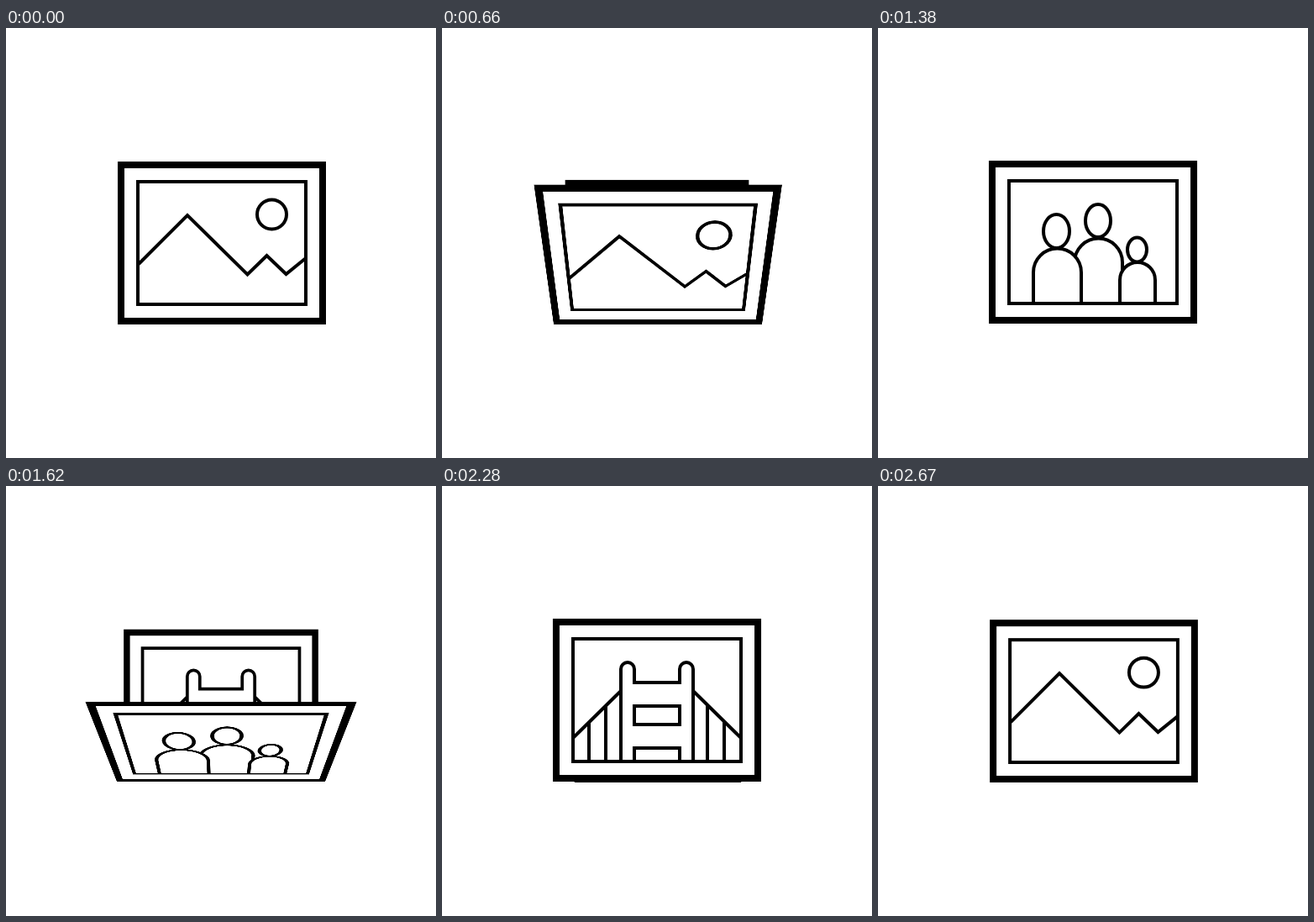
Animation, 512 px wide and 512 px high, one loop 2700 ms. Source, as an HTML page:

```html
<!DOCTYPE html>
<html lang="en">
<head>
<meta charset="utf-8">
<title>Falling picture frames</title>
<style>
  html, body { margin: 0; width: 100%; height: 100%; overflow: hidden; background: #fff; }
  #stage {
    position: relative; width: 512px; height: 512px; overflow: hidden;
    perspective: 725px; perspective-origin: 256px 256px;
  }
  svg {
    position: absolute; left: 0; top: 0; width: 512px; height: 512px;
    transform-origin: 256px 352px;
    fill: none; stroke: #000; stroke-width: 4;
  }
  .solid { fill: #fff; }
  .outer { fill: #fff; stroke-width: 8; }
</style>
</head>
<body>
<div id="stage"></div>
<script>
const HOLD = 470, MOVE = 420, SLOT = 900, STEP = 30;

const line = d => `<path d="${d}"/>`;
const head = (x, y, rx, ry) => `<ellipse class="solid" cx="${x}" cy="${y}" rx="${rx}" ry="${ry}"/>`;
const body = (x, y, r) =>
  `<path class="solid" d="M${x - r} 328V${y}a${r} ${r} 0 0 1 ${2 * r} 0V328"/>`;

const mountains =
  line('M157 280L215 222L286.5 292.5L309.5 270L332.5 292L356 273') +
  '<circle cx="315.5" cy="221" r="17.5"/>';

const family =
  body(262.5, 279, 28.5) + head(262, 229.5, 15, 19.5) +
  body(213.5, 291, 28.5) + head(212.5, 242, 15.5, 20) +
  body(309, 300, 21) + head(308.5, 264, 11.5, 14.5);

const bridge =
  line('M213 328V218a8 8 0 0 1 16 0V234H283V218a8 8 0 0 1 16 0V328') +
  line('M229 262H283V284H229ZM229 328V312H283V328') +
  line('M156 300L213 244M299 244L356 300') +
  line('M175 281V328M195 262V328M316 261V328M336 280V328');

// shift: offset of the resting place; gone: progress at which the falling frame vanishes
const pictures = [
  { art: mountains, shift: 1, gone: 0.95 },
  { art: family, shift: 0, gone: 0.9 },
  { art: bridge, shift: 0, gone: 0.9 }
];

const stage = document.getElementById('stage');
for (const p of pictures) {
  stage.insertAdjacentHTML('beforeend',
    `<svg viewBox="0 0 512 512" style="left:${p.shift}px;top:${p.shift}px">
      <rect class="outer" x="136" y="162" width="240" height="186"/>
      ${p.art}
      <rect x="156" y="182" width="200" height="146"/>
    </svg>`);
  p.style = stage.lastElementChild.style;
}

function ease(x) {
  x = Math.min(1, Math.max(0, x));
  return x < 0.5 ? 2 * x * x : 1 - 2 * (1 - x) ** 2;
}

function draw(now) {
  const t = Math.floor(now % (SLOT * pictures.length) / STEP) * STEP;
  const i = Math.floor(t / SLOT);
  const e = ease((t % SLOT - HOLD) / MOVE);
  const front = pictures[i], back = pictures[(i + 1) % pictures.length];

  for (const p of pictures) p.style.visibility = 'hidden';
  if (e > 0) {
    back.style.visibility = 'visible';
    back.style.zIndex = 0;
    back.style.transform = e < 1 ? `scale(${0.8 + 0.2 * e})` : 'none';
  }
  if (e < front.gone) {
    front.style.visibility = 'visible';
    front.style.zIndex = 1;
    front.style.transform = e > 0 ? `rotateX(${-90 * e}deg)` : 'none';
  }
}

const start = performance.now();
function tick() {
  draw(performance.now() - start);
  requestAnimationFrame(tick);
}
tick();
</script>
</body>
</html>
```
